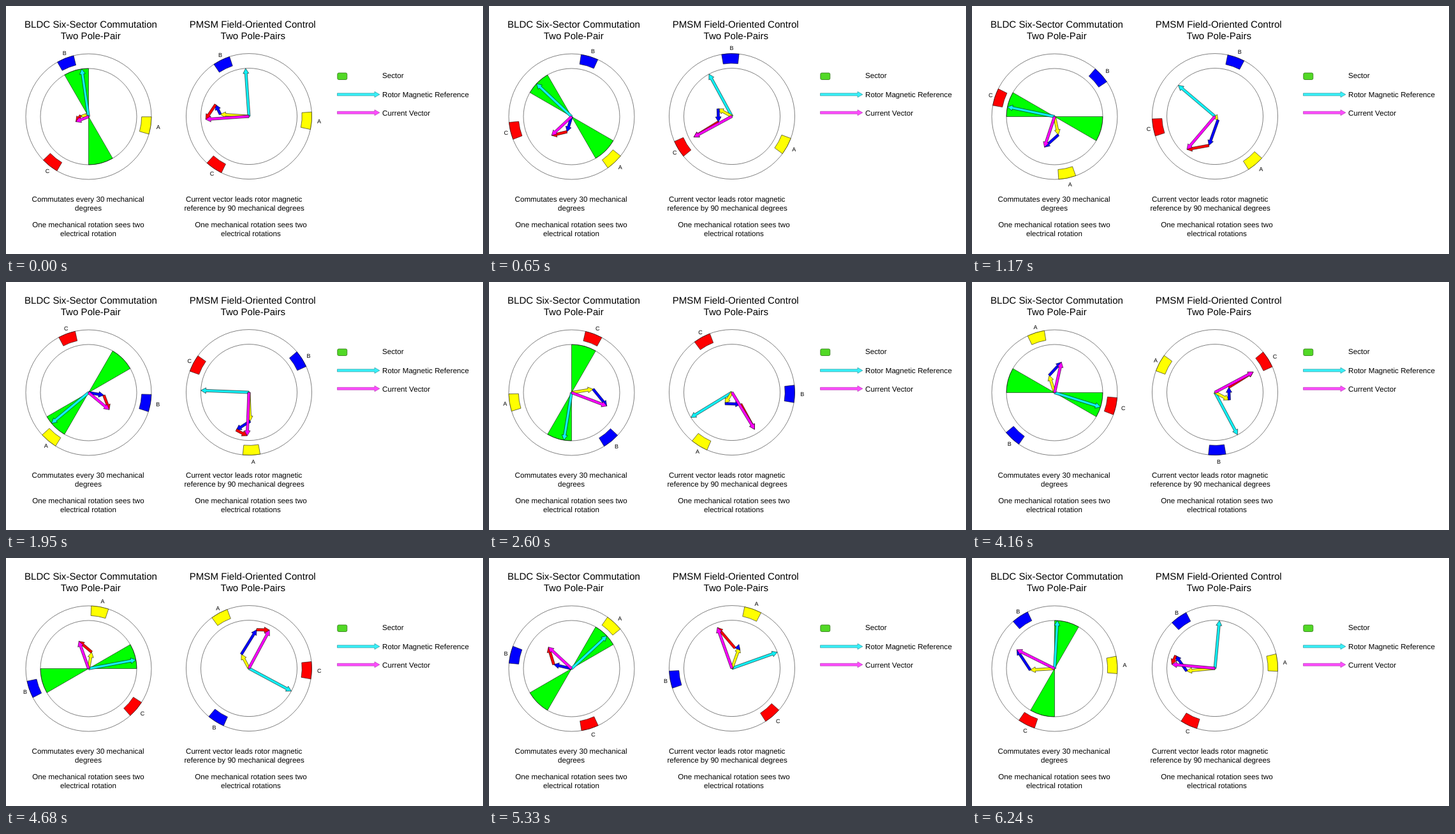
Write an HTML page that moves like this. It is 748 by 389 pixels and loops after 6370 ms.

```html
<!DOCTYPE html>
<html lang="en">
<head>
<meta charset="utf-8">
<title>Motor commutation</title>
<style>
  html, body { margin: 0; width: 100%; height: 100%; overflow: hidden; background: #fff; }
  svg { display: block; width: 748px; height: 389px; }
  text { font-family: "Liberation Sans", Arial, sans-serif; font-size: 11.65px; text-rendering: geometricPrecision; }
  .title { font-size: 15.1px; }
  .mid { text-anchor: middle; }
  .label { font-size: 9px; text-anchor: middle; }
  path, circle { stroke: #000; stroke-width: .55; stroke-linejoin: round; }
  circle { fill: none; stroke-width: .5; }
  .key { stroke-width: .8; }
</style>
</head>
<body>
<svg viewBox="0 0 748 389">
  <g class="mid">
    <text class="title" x="133" y="33.7">BLDC Six-Sector Commutation</text>
    <text class="title" x="132.7" y="51.7">Two Pole-Pair</text>
    <text class="title" x="386.7" y="33.7">PMSM Field-Oriented Control</text>
    <text class="title" x="387.3" y="51.7">Two Pole-Pairs</text>
    <text x="128.5" y="307.2">Commutates every 30 mechanical</text>
    <text x="129" y="321.4">degrees</text>
    <text x="129" y="347">One mechanical rotation sees two</text>
    <text x="129" y="361.2">electrical rotation</text>
    <text x="373.2" y="307.2">Current vector leads rotor magnetic</text>
    <text x="373.6" y="321.4">reference by 90 mechanical degrees</text>
    <text x="384" y="347">One mechanical rotation sees two</text>
    <text x="384" y="361.2">electrical rotations</text>
  </g>
  <rect class="key" x="519.8" y="105" width="15" height="10.5" rx="2" fill="#52d926" stroke="#2c7414"/>
  <text x="590" y="112.6">Sector</text>
  <text x="590" y="142.6">Rotor Magnetic Reference</text>
  <text x="590" y="171.6">Current Vector</text>
  <g id="art"></g>
</svg>
<script>
const STEP = 130, STEPS = 49;
const OUTER = 98.5, INNER = 75.5, COIL = 83.2, LABEL = 108;
const CYAN = '#12f0f5', MAGENTA = '#ff00ff', GREEN = '#00ff00';
const PHASES = [['A', '#ffff00'], ['B', '#0000ff'], ['C', '#ff0000']];
// Phase current signs (A, B, C) in each 30 degree sector
const SIX_STEP = [[1, 0, -1], [0, 1, -1], [-1, 1, 0], [-1, 0, 1], [0, -1, 1], [1, -1, 0]];
// Rotor travel: [step, degrees]
const BLDC_TURN = [[0, 8.2], [9, 78.3], [20, 170.8], [27, 217.4], [36, 280.5], [41, 312.9], [48, 356.6]];
const PMSM_TURN = [[0, 4], [9, 49.7], [20, 121.4], [27, 169.2], [36, 241.8], [41, 289.6], [48, 354.7]];

const art = document.getElementById('art');

function add(tag, attrs) {
  const el = document.createElementNS('http://www.w3.org/2000/svg', tag);
  for (const key in attrs) el.setAttribute(key, attrs[key]);
  return art.appendChild(el);
}

// Point reached by going r along an angle, counter-clockwise from east
function polar([x, y], r, deg) {
  const a = deg * Math.PI / 180;
  return [x + r * Math.cos(a), y - r * Math.sin(a)];
}

const fmt = p => p[0].toFixed(2) + ' ' + p[1].toFixed(2);

function arrowPath(from, to) {
  const dx = to[0] - from[0], dy = to[1] - from[1], len = Math.hypot(dx, dy);
  if (len < 0.5) return '';
  const ux = dx / len, uy = dy / len, neck = Math.max(0, len - 8);
  const at = (along, side) => fmt([from[0] + ux * along - uy * side, from[1] + uy * along + ux * side]);
  return 'M' + [at(0, 2), at(neck, 2), at(neck, 4.5), at(len, 0), at(neck, -4.5), at(neck, -2), at(0, -2)].join('L') + 'Z';
}

function wedgePath(centre, r0, r1, a0, a1) {
  const p = (r, a) => fmt(polar(centre, r, a));
  return `M${p(r0, a0)}L${p(r1, a0)}A${r1} ${r1} 0 0 0 ${p(r1, a1)}L${p(r0, a1)}` +
    (r0 ? `A${r0} ${r0} 0 0 1 ${p(r0, a0)}Z` : 'Z');
}

// Smooth curve through the knots
function travel(knots, n) {
  const last = knots.length - 1;
  const rate = i => (knots[i + 1][1] - knots[i][1]) / (knots[i + 1][0] - knots[i][0]);
  const slope = i => i === 0 ? rate(0) : i === last ? rate(last - 1) : (rate(i - 1) + rate(i)) / 2;
  let i = 0;
  while (i < last - 1 && n >= knots[i + 1][0]) i++;
  const [x0, y0] = knots[i], [x1, y1] = knots[i + 1], h = x1 - x0, t = (n - x0) / h;
  const ease = t * t * (3 - 2 * t);
  return y0 + (y1 - y0) * ease + h * (slope(i) * t * (1 - t) ** 2 - slope(i + 1) * t * t * (1 - t));
}

function bldcCurrents(turn, n) {
  const rotor = turn + 90, into = rotor % 30;
  const startUp = 1 - 0.48 * Math.exp(-n / 6.5);
  const size = (14 + 1.35 * into - 0.0165 * into * into) * startUp;
  return SIX_STEP[Math.floor(rotor / 30) % 6].map(sign => sign * size);
}

function pmsmCurrents(turn) {
  return [0, 120, 240].map(lag => 45.4 * Math.cos((2 * turn + 180 - lag) * Math.PI / 180));
}

function makeMotor(centre, knots, currents, hasSectors) {
  const [cx, cy] = centre;
  const shape = fill => add('path', { fill });
  const wedges = hasSectors ? [shape(GREEN), shape(GREEN)] : [];
  add('circle', { cx, cy, r: OUTER });
  add('circle', { cx, cy, r: INNER });
  const coils = PHASES.map(p => shape(p[1]));
  const labels = PHASES.map(p => {
    const el = add('text', { class: 'label' });
    el.textContent = p[0];
    return el;
  });
  const rotorArrow = shape(CYAN);
  const phaseArrows = PHASES.map(p => shape(p[1]));
  const sumArrow = shape(MAGENTA);

  return n => {
    const turn = travel(knots, n), rotor = 90 + turn, amps = currents(turn, n);
    wedges.forEach((el, i) => {
      const start = Math.floor(rotor / 30) * 30 + i * 180;
      el.setAttribute('d', wedgePath(centre, 0, INNER, start, start + 30));
    });
    rotorArrow.setAttribute('d', arrowPath(centre, polar(centre, INNER, rotor)));
    let tip = centre;
    PHASES.forEach((p, i) => {
      const axis = 120 * i - turn;
      coils[i].setAttribute('d', wedgePath(centre, COIL, OUTER, axis - 8, axis + 8));
      const [x, y] = polar(centre, LABEL, axis);
      labels[i].setAttribute('x', (x + 2.3).toFixed(2));
      labels[i].setAttribute('y', (y + 3.7).toFixed(2));
      const next = polar(tip, amps[i], axis);
      phaseArrows[i].setAttribute('d', arrowPath(tip, next));
      tip = next;
    });
    sumArrow.setAttribute('d', arrowPath(centre, tip));
  };
}

function keyArrow(y, fill, edge) {
  add('path', { d: arrowPath([519.5, y], [586, y]), fill, style: `stroke: ${edge}` });
}
keyArrow(138.8, '#38f0f8', '#16808a');
keyArrow(167.3, '#ff4cff', '#a02ca0');

const motors = [
  makeMotor([129.5, 173.5], BLDC_TURN, bldcCurrents, true),
  makeMotor([381, 173.1], PMSM_TURN, pmsmCurrents, false)
];
const begin = performance.now();
let shown = -1;

function draw() {
  const n = Math.floor((performance.now() - begin) / STEP) % STEPS;
  if (n !== shown) motors.forEach(pose => pose(n));
  shown = n;
  requestAnimationFrame(draw);
}
draw();
</script>
</body>
</html>
```
